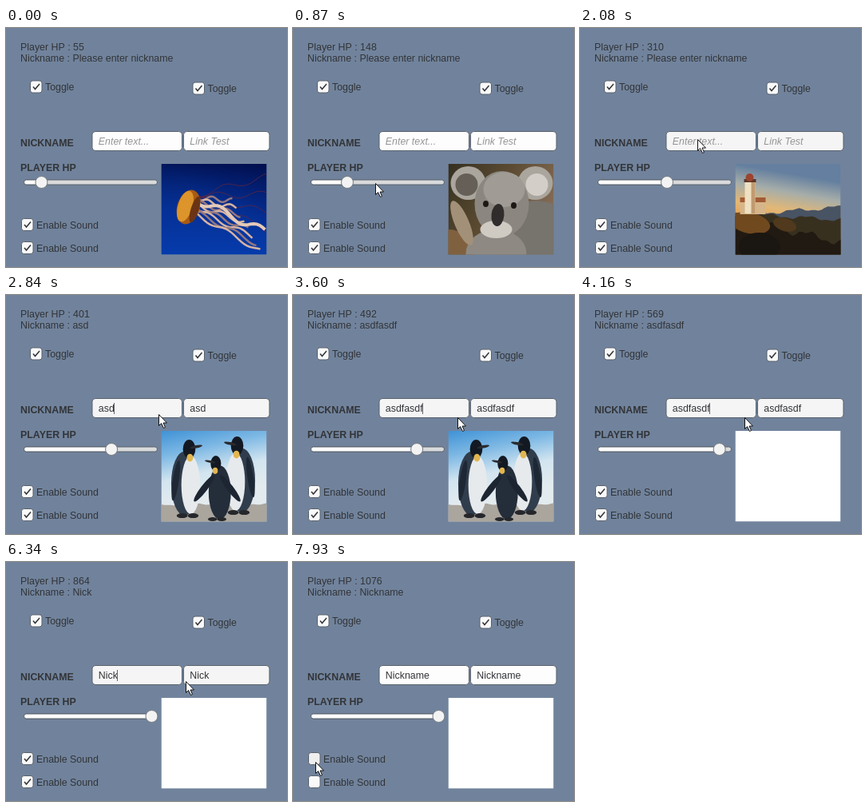
Recreate the animation shown at these times as an HTML page with a canvas. Size 352 by 299 pixels, loop 8 s.

```html
<!DOCTYPE html>
<html lang="en">
<head>
<meta charset="utf-8">
<title>Data binding demo</title>
<style>
html, body { margin: 0; width: 100%; height: 100%; overflow: hidden; background: #71839c; }
canvas { display: block; }
</style>
</head>
<body>
<canvas id="stage" width="352" height="299"></canvas>
<script>
const ctx = document.getElementById('stage').getContext('2d');
const LOOP = 8000, TICK = 94.05;
const INK = '#323438', EDGE = '#59616d', BACK = '#71839c';
const FONT = '12.4px "Liberation Sans", Arial, sans-serif';
const PHOTO = { x: 194.5, y: 170, w: 132, h: 113.5 };

// Uneven frame rate makes the counter speed drift: [tick, hit points].
const hpKeys = [[-1, 55], [9, 148], [22, 310], [38, 492], [52, 672], [67, 864], [84, 1076]];

// Each stop is reached at `at` after a short glide.
const GLIDE = 450;
const stops = [
  { at: 450, x: 103, y: 194 },
  { at: 2070, x: 147, y: 139 },
  { at: 3000, x: 206, y: 153 },
  { at: 4700, x: 225, y: 149 },
  { at: 7450, x: 28, y: 250 }
];

const clamp = v => Math.min(1, Math.max(0, v));
const mix = (a, b, p) => a + (b - a) * p;
const ease = p => p * p * (3 - 2 * p);

function hpAt(tick) {
  const next = Math.max(1, hpKeys.findIndex(([k]) => k >= tick));
  const [a, from] = hpKeys[next - 1], [b, to] = hpKeys[next];
  return Math.round(mix(from, to, clamp((tick - a) / (b - a))));
}

function typed(word, t, start, step) {
  return word.slice(0, Math.max(0, Math.floor((t - start) / step) + 1));
}

function nicknameAt(t) {
  if (t < 4350) return typed('asdfasdf', t, 2600, 100);
  if (t < 5200) return 'asdfasdf'.slice(0, Math.max(1, 7 - Math.floor((t - 4350) / 70)));
  return typed('Nickname', t, 5900, 112);
}

function text(str, x, y, color = INK, style = '') {
  ctx.font = `${style} ${FONT}`;
  ctx.fillStyle = color;
  ctx.fillText(str, x, y);
}

function paint(fill, stroke, width = 1) {
  if (fill) {
    ctx.fillStyle = fill;
    ctx.fill();
  }
  if (stroke) {
    ctx.strokeStyle = stroke;
    ctx.lineWidth = width;
    ctx.stroke();
  }
}

function box(x, y, w, h, r, fill) {
  ctx.beginPath();
  ctx.roundRect(x, y, w, h, r);
  paint(fill, EDGE);
}

function polyline(points) {
  ctx.beginPath();
  points.forEach(p => ctx.lineTo(...p));
}

function oval(x, y, rx, ry, fill, angle = 0) {
  ctx.beginPath();
  ctx.ellipse(x, y, rx, ry, angle, 0, 7);
  paint(fill);
}

function rect(x, y, w, h, fill) {
  ctx.fillStyle = fill;
  ctx.fillRect(x, y, w, h);
}

function backdrop(x, y, ...colors) {
  const g = ctx.createLinearGradient(0, 0, x, y);
  colors.forEach((c, i) => g.addColorStop(i / (colors.length - 1), c));
  rect(0, 0, PHOTO.w, PHOTO.h, g);
}

function tentacle(x, y, dx, dy, amp, phase, color, width) {
  polyline(Array.from({ length: 25 }, (_, i) => {
    const p = i / 24;
    return [x + dx * p, y + dy * p + amp * Math.sin(p * 11 + phase)];
  }));
  paint(null, color, width);
}

function ridge(left, right, rough, color) {
  const line = [[0, 120]];
  for (let x = 0; x <= 136; x += 4) {
    const bump = Math.sin(x * 0.13 + left) + Math.sin(x * 0.37) / 2;
    line.push([x, mix(left, right, x / 132) + rough * bump]);
  }
  polyline([...line, [136, 120]]);
  paint(color);
}

function jellyfish() {
  backdrop(70, -100, '#0636a4', '#03207c', '#020b45');
  backdrop(0, 114, '#01083cb0', '#03206c40', '#0648c050');
  for (let i = 0; i < 4; i++) tentacle(40, 40, 92, -24 + i * 22, 4, i, '#6a2638', 0.7);
  for (let i = 0; i < 8; i++) {
    tentacle(44, 42 + i * 3, 45 + i * 5, 4 + i * 6, 3, i * 1.7, i % 2 ? '#d6b3a2' : '#94777f', 2.5);
  }
  tentacle(46, 45, 84, 40, 5, 1, '#e5c9b8', 4);
  oval(34, 54, 14, 22, '#a95a14', 0.3);
  oval(30, 53, 9, 20, '#dc942b', 0.3);
  oval(42, 57, 5, 17, '#6b3414', 0.3);
}

function koala() {
  backdrop(132, 70, '#35301f', '#5d4c33', '#8a705b');
  oval(0, 112, 32, 30, '#80613f');
  oval(110, 94, 50, 48, '#77736d');
  oval(60, 112, 38, 30, '#8e8a83');
  oval(17, 74, 9, 30, '#a39078', -0.4);
  for (const side of [-1, 1]) {
    const x = 67 + side * 42;
    oval(x, 24, 22, 21, '#aaa59d');
    oval(x + side * 2, 26, 14, 14, side < 0 ? '#655f58' : '#d3cec8');
  }
  oval(67, 50, 34, 41, '#8b8780');
  oval(70, 32, 26, 22, '#a09b94');
  oval(60, 82, 20, 11, '#cfcac2');
  oval(47, 50, 3.5, 4, '#1d1814');
  oval(82, 52, 3.5, 4, '#1d1814');
  oval(62, 64, 8, 14, '#302c2b', 0.1);
}

function lighthouse() {
  backdrop(-12, 68, '#647f9f', '#a6ada9', '#e2b877', '#e79a4a');
  ridge(64, 54, 2, '#485363');
  ridge(62, 70, 2, '#38301f');
  ridge(68, 98, 4, '#211a12');
  oval(18, 74, 26, 13, '#70491f', 0.2);
  oval(62, 76, 15, 8, '#51391d', 0.3);
  oval(30, 104, 26, 18, '#1a1611');
  rect(6, 44, 32, 19, '#d7b58a');
  rect(6, 42, 32, 6, '#a25c35');
  rect(12, 22, 13, 40, '#f0e0c2');
  rect(20, 22, 5, 40, '#c19a70');
  rect(11, 19, 15, 4, '#5a382c');
  oval(18, 17, 5, 5, '#9c4430');
}

function penguin(x, y, h, facing, fromBehind) {
  ctx.save();
  ctx.translate(x, y);
  ctx.scale(facing * h / 100, h / 100);
  oval(-4, 56, 17, 41, fromBehind ? '#242d3a' : '#303d4d');
  if (fromBehind) {
    for (const side of [-1, 1]) oval(side * 20, 50, 5, 25, '#1c2531', -side * 0.65);
  } else {
    oval(4, 58, 12, 37, '#e6eaec');
    oval(-15, 52, 4, 26, '#1e2835', 0.15);
  }
  oval(2, 12, 8, 12, '#131922');
  oval(11, 9, 8, 1.8, '#2a2a2d', -0.2);
  oval(3, 23, 4, 5, '#e2b650');
  for (const side of [-1, 1]) oval(side * 7, 97, 7, 3, '#25272b');
  ctx.restore();
}

function penguins() {
  backdrop(20, 92, '#3f92d6', '#7db8e4', '#d3e5f0', '#e3ebee');
  ridge(93, 91, 1, '#aaa59d');
  penguin(33, 11, 98, 1, false);
  penguin(97, 7, 98, -1, false);
  penguin(70, 31, 82, -1, true);
}

function blank() {
  rect(0, 0, PHOTO.w, PHOTO.h, '#fff');
}

function photo(t) {
  const slides = [jellyfish, koala, lighthouse, penguins, blank];
  const index = Math.floor((t + 300) / 1010);
  ctx.save();
  ctx.translate(PHOTO.x, PHOTO.y);
  ctx.beginPath();
  ctx.rect(0, 0, PHOTO.w, PHOTO.h);
  ctx.clip();
  slides[Math.min(index, slides.length - 1)]();
  ctx.restore();
}

function toggle(x, y, label, on, fill = '#f9f9f9') {
  box(x, y, 14.5, 15, 3, fill);
  if (on) {
    polyline([[x + 3.5, y + 7.5], [x + 6, y + 10.5], [x + 11.5, y + 4]]);
    paint(null, INK, 1.5);
  }
  text(label, x + 18.5, y + 12);
}

function field(x, w, value, hint, fill, caret) {
  box(x, 129.5, w, 24, 4, fill);
  const left = x + 7.8;
  if (value) text(value, left, 146);
  else text(hint, left, 146, '#959596', 'italic');
  if (caret) {
    ctx.font = FONT;
    rect(Math.floor(left + ctx.measureText(value).width), 135, 1, 14, '#62646a');
  }
}

function slider(hp) {
  const x = 30.5 + Math.min(600, hp) * 152 / 600;
  box(22.5, 190, 167, 6, 3, '#d8dadb');
  box(22.5, 190, x - 22.5, 6, 3, '#fcfcfc');
  ctx.beginPath();
  ctx.arc(x, 193, 7.5, 0, 7);
  paint('#f3f3f3', '#757b83');
}

function pointer(t) {
  if (t < stops[0].at) return;
  let { x, y } = stops[0];
  for (const stop of stops) {
    const p = ease(clamp((t - stop.at + GLIDE) / GLIDE));
    x = mix(x, stop.x, p);
    y = mix(y, stop.y, p);
  }
  ctx.save();
  ctx.translate(Math.round(x) + 0.5, Math.round(y) + 0.5);
  polyline([[0, 0], [0, 14], [3, 11], [6, 17], [8, 16], [5.5, 10.5], [10, 10.5]]);
  ctx.closePath();
  paint('#fff', '#111');
  ctx.restore();
}

function draw(ms) {
  const tick = Math.floor((ms % LOOP - 30) / TICK + 0.25);
  const t = Math.max(0, 30 + tick * TICK);
  const name = nicknameAt(t);
  const focused = t >= 2300 && t < 7650;
  const fieldFill = t >= 2000 && t < 7000 ? '#f5f5f5' : '#fdfdfd';
  const sound = t < 7700;
  const hp = hpAt(tick);

  rect(0, 0, 352, 299, BACK);
  text(`Player HP : ${hp}`, 18, 27.5);
  text(`Nickname : ${name || 'Please enter nickname'}`, 18, 42);
  toggle(30.5, 66, 'Toggle', true);
  toggle(234, 68, 'Toggle', true);
  text('NICKNAME', 18, 147.5, INK, 'bold');
  field(108, 112.5, name, 'Enter text...', fieldFill, focused);
  field(222.5, 107.5, name, 'Link Test', fieldFill, false);
  text('PLAYER HP', 18, 179, INK, 'bold');
  slider(hp);
  toggle(19.5, 238.5, 'Enable Sound', sound, t > 7400 ? '#eeeeee' : '#f9f9f9');
  toggle(19.5, 267.5, 'Enable Sound', sound);
  photo(t);
  pointer(t);
}

const start = performance.now();
function loop() {
  draw(performance.now() - start);
  requestAnimationFrame(loop);
}
loop();
</script>
</body>
</html>
```
